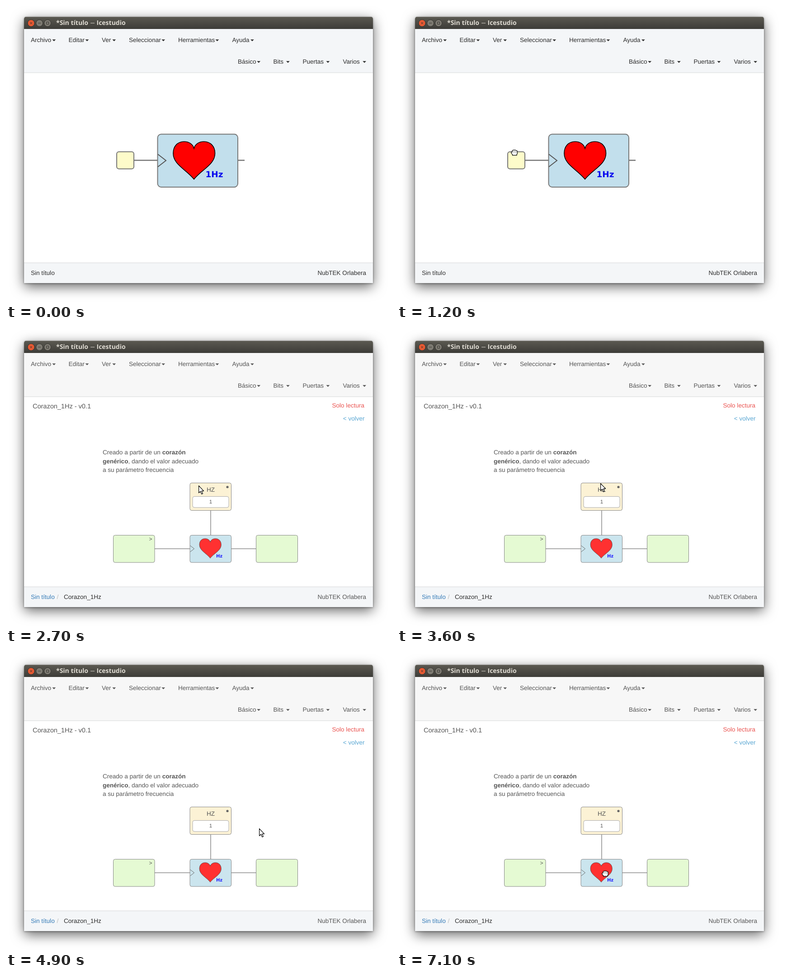
Write an HTML page that moves like this. It is 852 by 657 pixels and loops after 8 s.

```html
<!DOCTYPE html>
<html lang="es">
<head>
<meta charset="utf-8">
<title>Icestudio</title>
<style>
html, body { margin: 0; width: 100%; height: 100%; overflow: hidden; background: #fff; }
#win { position: absolute; left: 40px; top: 24px; width: 772px; height: 591px; border-radius: 5px 5px 0 0;
  background: #fff; box-shadow: 0 8px 28px rgba(0,0,0,.6), 0 1px 4px rgba(0,0,0,.4); }
svg { position: absolute; left: 0; top: 0; }
text { font: 13.54px "Liberation Sans", Arial, sans-serif; text-rendering: geometricPrecision; white-space: pre; }
.end { text-anchor: end; }
.mid { text-anchor: middle; }
.title text { font: bold 14px "Open Sans", "Noto Sans", sans-serif; fill: #dfdbd2; }
.hz { font: bold 18.4px "DejaVu Sans", sans-serif; fill: #00e; }
.chrome { fill: #2c2c2c; }
.chrome .nav { fill: #f4f6f8; }
.inside .chrome { fill: #555; }
.inside .chrome .nav { fill: #f7f7f7; }
.inside #top, #sub { display: none; }
.inside #sub { display: inline; }
#top { stroke: #777; stroke-width: 2; }
#sub { fill: #555; }
.box { stroke: #888; stroke-width: 1; }
.wire { stroke: #8a8a8a; stroke-width: 1.5; fill: none; }
#top text, #sub text { stroke: none; }
</style>
</head>
<body>
<div id="win"></div>
<svg id="stage" width="852" height="657" viewBox="0 0 852 657">
  <defs>
    <linearGradient id="bar" x2="0" y2="1">
      <stop offset="0" stop-color="#5b5951"/><stop offset="1" stop-color="#3d3c38"/>
    </linearGradient>
    <path id="heart" d="M416 316C419 305 429 301 438 301C453 301 462.5 312 462.5 327C462.5 352 433 363 416 384.5C399 363 370 352 370 327C370 312 379 301 394 301C403 301 413 305 416 316Z"/>
  </defs>

  <g class="title">
    <path d="M40 51V29q0-5 5-5H807q5 0 5 5V51Z" fill="url(#bar)"/>
    <path d="M44 24.5H808" stroke="#6f6d65"/>
    <g stroke="#35342f">
      <circle cx="55.5" cy="38" r="7.5" fill="#ea5a33"/>
      <circle cx="74" cy="38" r="7.5" fill="#7d7a72"/>
      <circle cx="92" cy="38" r="7.5" fill="#7d7a72"/>
      <path d="M53 35.5l5 5m0-5l-5 5M71 38h6M89.5 35.5h5v5h-5z" fill="none"/>
    </g>
    <text x="111" y="42">*Sin título</text>
    <path d="M187 38H196" stroke="#dfdbd2"/>
    <text x="200.5" y="42">Icestudio</text>
  </g>

  <g class="chrome">
    <path class="nav" d="M40 51H812V148H40Z"/>
    <path d="M40 570H812V615H40Z" fill="#f4f6f8"/>
    <path d="M40 148H812M40 570H812" stroke="#d6d7d8"/>
    <g id="menus"></g>
    <text class="end" x="797" y="597">NubTEK Orlabera</text>
  </g>

  <g id="top">
    <path d="M283 342.5H335M513 342.5H528" stroke-width="2.5"/>
    <rect x="245" y="323.5" width="38" height="38" rx="5" fill="#fdfbca"/>
    <rect x="335.5" y="284.5" width="177.5" height="117.5" rx="8" fill="#c2dfec"/>
    <path d="M336 329L354 343L336 357" fill="none" stroke="#555"/>
    <use href="#heart" fill="#f00" stroke="#000" stroke-width="1.6"/>
    <text class="hz" x="441.5" y="379.5">1Hz</text>
    <text x="55" y="597" fill="#2c2c2c">Sin título</text>
  </g>

  <g id="sub">
    <text x="59" y="173.5" style="font-size:14.5px">Corazon_1Hz - v0.1</text>
    <text class="end" x="793" y="172" fill="#ea5451">Solo lectura</text>
    <text class="end" x="793.5" y="201" fill="#58a6d2">&lt; volver</text>
    <text x="214" y="276">Creado a partir de un <tspan font-weight="bold">corazón</tspan></text>
    <text x="214" y="295.5"><tspan font-weight="bold">genérico</tspan>, dando el valor adecuado</text>
    <text x="214" y="315">a su parámetro frecuencia</text>
    <path class="wire" d="M453 400V456M329 485.5H407M498 485.5H554"/>
    <g class="box">
      <rect x="407" y="339.5" width="91.5" height="61" rx="4" fill="#fcf2d5"/>
      <rect x="413" y="369.5" width="80" height="24.5" rx="4" fill="#fff" stroke="#aaa"/>
      <rect x="237.5" y="455.5" width="91.5" height="60.5" rx="4" fill="#e5fad3"/>
      <rect x="407" y="455.5" width="91.5" height="60.5" rx="4" fill="#cbe5ee"/>
      <rect x="553.5" y="455.5" width="92" height="60.5" rx="4" fill="#e5fad3"/>
      <path d="M407.5 478.5L416.5 485.5L407.5 492.5" fill="none" stroke="#666"/>
    </g>
    <circle cx="490" cy="348.5" r="2.6" fill="#666"/>
    <text class="mid" x="453" y="359">HZ</text>
    <text class="mid" x="453" y="385" style="font-size:11.6px">1</text>
    <text x="316.5" y="467.5" style="font-size:12px">&gt;</text>
    <use href="#heart" transform="translate(235.7 306.5) scale(.52)" fill="#ff3131" stroke="#444" stroke-width="1.6"/>
    <text class="hz" x="465" y="505" style="font-size:10px;fill:#22f">Hz</text>
    <text x="55" y="597" fill="#337ab7">Sin título</text>
    <text x="112.5" y="597" fill="#bbb">/</text>
    <text x="128" y="597" fill="#2c2c2c">Corazon_1Hz</text>
  </g>

  <g id="cursor" fill="#fff" stroke="#000" stroke-linejoin="round">
    <path id="arrow" stroke-width="1.2" d="M.6 .6V16.6L4.3 13.2L6.9 19.2L9.4 18.1L6.8 12.3H11.6Z"/>
    <g id="hand" transform="translate(-7 -3)">
      <path stroke-width="1.2" d="M3.5 12.4V10.6L.8 7.7V5.6L3 5V2.6Q3 .9 5 1.2Q6 .2 7.5 .9Q9 .2 10.2 1.1Q12 .8 12.5 2.2Q14.4 2.2 14.4 4V8L13 10.6V12.4Z"/>
      <path stroke-width=".9" d="M5.2 4v1.5M7.6 4v1.5M10 4v1.5M12.3 4.5v1.5"/>
    </g>
  </g>
</svg>
<script>
const $ = id => document.getElementById(id);

// label, text x, caret x, baseline
const menus = [
  ['Archivo', 55, 102.3, 80], ['Editar', 138.5, 175.5, 80], ['Ver', 212, 235.3, 80],
  ['Seleccionar', 272, 344.3, 80], ['Herramientas', 381, 463.5, 80], ['Ayuda', 500.5, 541, 80],
  ['Básico', 513, 555.3, 128], ['Bits', 591.5, 620, 128],
  ['Puertas', 656.5, 708.5, 128], ['Varios', 745.5, 789.3, 128]
];
$('menus').innerHTML = menus.map(([label, x, caret, y]) =>
  `<text x="${x}" y="${y}">${label}</text><path d="M${caret} ${y - 5.7}h7.8l-3.9 3.9z"/>`).join('');

// time, x, y of the pointer's hot spot
const path = [
  [500, 0, 211], [700, 98, 262], [900, 205, 312], [1000, 250, 325], [1100, 268, 328], [1200, 259, 322],
  [1300, 259, 322], [1500, 325, 328], [1700, 412, 342], [1800, 426, 345],
  [3400, 426, 345], [3600, 450, 340], [3900, 520, 350], [4100, 549, 362], [4200, 552.5, 366], [4300, 553, 369],
  [4400, 553, 369], [4900, 560, 387], [5000, 560, 387], [5100, 560, 388],
  [6200, 560, 388], [6300, 549.5, 401.5], [6600, 515, 467], [6800, 501, 487], [7000, 465, 486], [7100, 460, 484]
];
const SWITCH = 2700, LOOP = 8000, STEP = 100;

function pointAt(t) {
  const i = path.findIndex(k => k[0] > t);
  if (i < 0) return path[path.length - 1].slice(1);
  const [t0, x0, y0] = path[i - 1], [t1, x1, y1] = path[i], f = (t - t0) / (t1 - t0);
  return [x0 + (x1 - x0) * f, y0 + (y1 - y0) * f];
}

const within = (x, y, l, t, r, b) => x >= l && x <= r && y >= t && y <= b;
const show = (el, on) => el.setAttribute('visibility', on ? 'visible' : 'hidden');

function draw(now) {
  const t = Math.floor(now % LOOP / STEP) * STEP, inside = t >= SWITCH, on = t >= path[0][0];
  $('stage').classList.toggle('inside', inside);
  const [x, y] = on ? pointAt(t) : [0, 0];
  const grab = inside ? within(x, y, 407, 455, 499, 516)
    : within(x, y, 244, 321, 284, 362) || within(x, y, 335, 284, 513, 402);
  $('cursor').setAttribute('transform', `translate(${x} ${y})`);
  show($('arrow'), on && !grab);
  show($('hand'), on && grab);
}

const start = performance.now();
function tick() {
  draw(performance.now() - start);
  requestAnimationFrame(tick);
}
tick();
</script>
</body>
</html>
```
